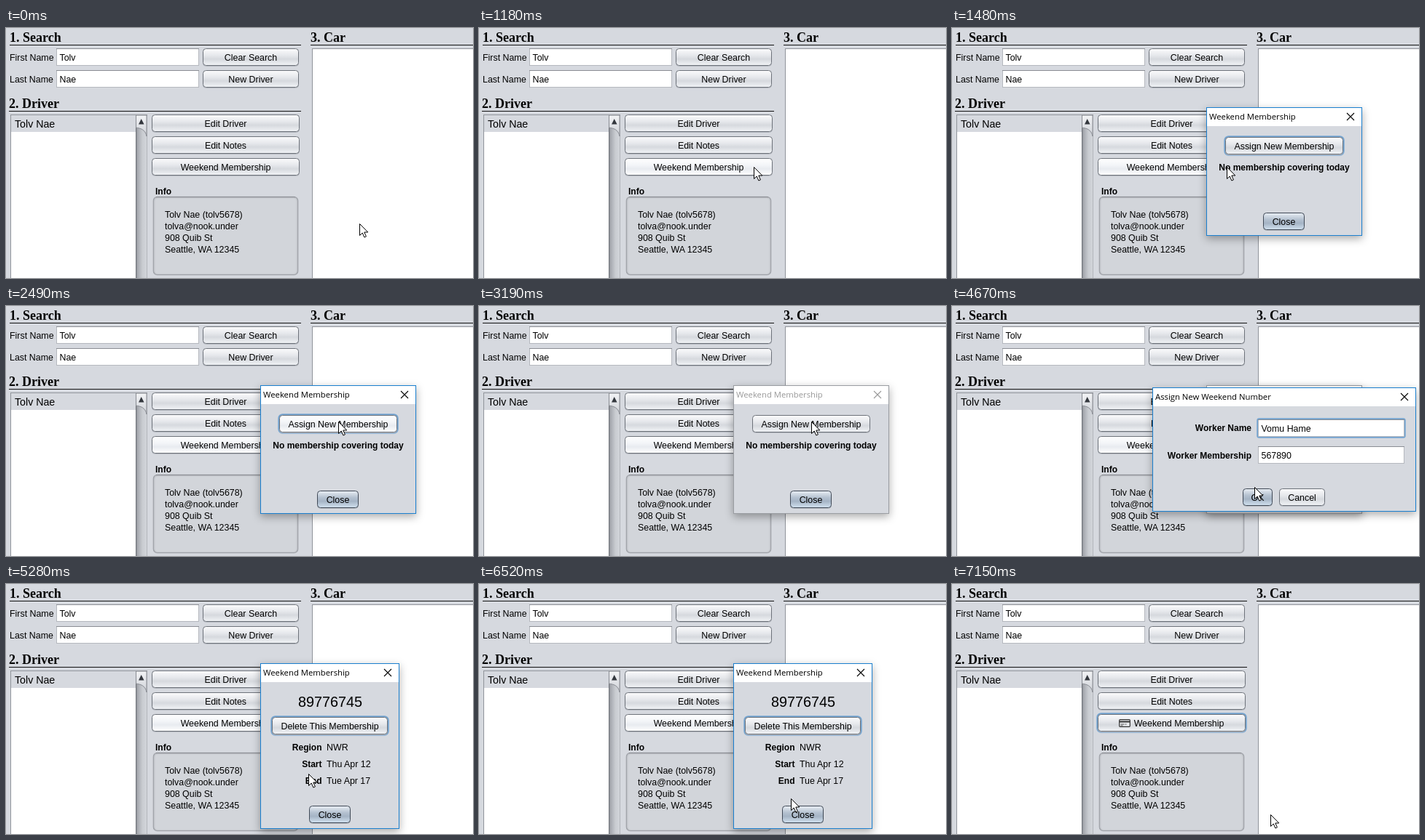
An HTML page that plays this animation: 641x344 px, repeating every 7.99 s.

```html
<!DOCTYPE html>
<html lang="en">
<head>
<meta charset="utf-8">
<title>Weekend membership</title>
<style>
  html, body { margin: 0; width: 100%; height: 100%; overflow: hidden; background: #d6d9df; }
  svg { display: block; width: 100%; height: 100%; }
  text { font: 12.4px "Liberation Sans", Arial, sans-serif; white-space: pre; }
  .bold { font-weight: bold; font-size: 12px; }
  .row { font-size: 14.2px; }
  .big { font-size: 19.8px; }
  .head { font: bold 18px "Liberation Serif", "Times New Roman", serif; }
  .title { font: 11.3px "Open Sans", sans-serif; }
  .window { filter: drop-shadow(0 4px 6px rgba(0, 0, 0, .33)); }
</style>
</head>
<body>
<svg viewBox="0 0 641 344">
  <defs id="defs"></defs>
  <g id="stage"></g>
</svg>
<script>
const LOOP = 7990;
const FIRST = 'Tolv', LAST = 'Nae', WORKER = 'Vomu Hame';

// Button faces: top, middle, lower middle, bottom, border
const FACES = {
  normal: ['#fbfbfc', '#e6e8ec', '#d6d9de', '#f1f3f6', '#6d727a'],
  hover: ['#ffffff', '#f3f5f8', '#e8ebf0', '#ffffff', '#6d727a'],
  main: ['#e9eef4', '#b4c1d0', '#a5b4c5', '#d2e2f0', '#414a57'],
  mainHover: ['#f6f9fc', '#c6d3e1', '#b8c8d9', '#e4f1fc', '#414a57'],
  pressed: ['#a3adba', '#8693a4', '#7c8a9c', '#a5b3c4', '#333b47']
};
const gradient = (id, stops, dir) => `<linearGradient id="${id}" ${dir}>` +
  stops.map(([at, c]) => `<stop offset="${at}" stop-color="${c}"/>`).join('') + '</linearGradient>';
document.getElementById('defs').innerHTML =
  Object.entries(FACES).map(([id, c]) =>
    gradient(id, [[0, c[0]], [.4, c[1]], [.62, c[2]], [1, c[3]]], 'x2="0" y2="1"')).join('') +
  gradient('track', [[0, '#85888e'], [.2, '#a9acb2'], [.6, '#c9ccd1'], [1, '#d3d6db']], '') +
  gradient('arrowBox', [[0, '#f2f3f5'], [1, '#cfd2d8']], 'x2="0" y2="1"');

const text = (x, y, s, cls = '', anchor = 'start', fill = '#000') =>
  `<text x="${x}" y="${y}" class="${cls}" text-anchor="${anchor}" fill="${fill}">${s}</text>`;
const box = (x, y, w, h, fill, stroke = 'none', r = 0, sw = 1) =>
  `<rect x="${x}" y="${y}" width="${w}" height="${h}" rx="${r}" fill="${fill}" stroke="${stroke}" stroke-width="${sw}"/>`;
const path = (d, fill, stroke = 'none', sw = 1) =>
  `<path d="${d}" fill="${fill}" stroke="${stroke}" stroke-width="${sw}"/>`;

function button(x, y, w, label, face = 'normal', ring = false, shift = 0) {
  return (ring ? box(x - .5, y - .5, w + 1, 25, 'none', '#73a4d1', 5, 2.4) : '') +
    box(x + .5, y + 1.5, w - 1, 23, 'none', '#b4b8bf', 4) +
    box(x + .5, y + .5, w - 1, 23, `url(#${face})`, FACES[face][4], 4) +
    text(x + w / 2 + shift, y + 17, label, '', 'middle');
}

function field(x, y, w, value, focus = false) {
  return (focus ? box(x - .5, y - .5, w + 1, 25, 'none', '#73a4d1', 2, 2.4) : '') +
    box(x + .5, y + .5, w - 1, 23, '#fff', '#b5b8be') +
    path(`M${x} ${y + .5}h${w}`, 'none', '#8a8d93') +
    text(x + 4.5, y + 17, value);
}

function dialog(x, y, w, h, bar, title, body, active = true, p = 1) {
  const ease = 1 - (1 - p) ** 2, s = .9 + .1 * ease;
  const cx = x + w / 2, cy = y + h / 2, kx = x + w - 16, ky = y + 13;
  const ink = active ? '#000' : '#999';
  return `<g class="window" opacity="${ease}" transform="translate(${cx} ${cy}) scale(${s}) translate(${-cx} ${-cy})">` +
    box(x + .5, y + .5, w - 1, h - 1, '#d6d9df', active ? '#1a7fcf' : '#9a9da2') +
    box(x + 1, y + 1, w - 2, bar, '#fff') +
    text(x + 4, y + 17, title, 'title', 'start', ink) +
    path(`M${kx - 5} ${ky - 5}l10 10m0 -10l-10 10`, 'none', ink, 1.1) + body + '</g>';
}

function mainWindow(weekend) {
  const underline = (x, y, end) => path(`M${x} ${y}H${end}`, 'none', '#111');
  const info = [`${FIRST} ${LAST} (tolv5678)`, 'tolva@nook.under', '908 Quib St', 'Seattle, WA 12345'];
  return box(0, 0, 641, 344, '#d6d9df') +
    text(5, 19, '1. Search', 'head') + underline(5, 23.5, 405) +
    text(4, 110, '2. Driver', 'head') + underline(4, 114.5, 405) +
    text(418, 19, '3. Car', 'head') + underline(418, 23.5, 641) +
    text(5, 45, 'First Name') + field(69, 28, 196, FIRST) +
    text(5, 75, 'Last Name') + field(69, 58, 196, LAST) +
    button(270, 28, 132, 'Clear Search') + button(270, 58, 132, 'New Driver') +
    // driver list with its scroll bar
    box(6.5, 119.5, 187, 240, '#fff', '#90949b') + box(7, 120, 171, 23, '#d6d9df') +
    box(178, 120, 15.5, 230, 'url(#track)') +
    path('M178.5 120V350', 'none', '#6f7379') +
    path('M178.5 120H193V149C191 139 184 138 178.5 137Z', 'url(#arrowBox)', '#8a8d94') +
    path('M182 132.5L185.7 125L189.500 132.5Z', '#33373d') +
    text(12, 137, `${FIRST} ${LAST}`, 'row') +
    button(200, 119, 203, 'Edit Driver') + button(200, 149, 203, 'Edit Notes') + weekend +
    text(205, 229, 'Info', 'bold') +
    box(202.5, 232.5, 198, 107, '#d2d5da', '#a1a4aa', 5, 1.6) +
    box(204, 234, 195, 104.500, 'none', '#c5c8cd', 4) +
    path('M206 232.700H397', 'none', '#888b91') +
    info.map((s, i) => text(218, 261 + 16 * i, s)).join('') +
    box(420.5, 28.5, 230, 330, '#fff', '#90949b');
}

const cardIcon = box(229.7, 186.700, 14.6, 9.6, '#e9ebee', '#333', 1, 1.2) +
  box(230, 188.500, 14, 2, '#333') + path('M231.5 193h5m1 0h2M231.5 194.900h3', 'none', '#444', .9);

const arrow = (x, y) => `<g transform="translate(${x + .5} ${y + .5})">` +
  path('M0 0V16L3.700 12.500L6.400 18.500L8.900 17.400L6.300 11.500H11.300Z', '#fff', '#000') + '</g>';
const beam = (x, y) => path(`M${x - 2.5} ${y - 5.500}h2.500l1 1l1 -1h2.500M${x + 1} ${y - 5}v13M${x - 2.500} ${y + 8.500}h2.500l1 -1l1 1h2.500`, 'none', '#222');

// Progress from a to b in n held steps, the first one already at 1/n
function steps(t, a, b, n) {
  return t < a ? 0 : Math.min(1, (Math.floor((t - a) / (b - a) * (n - 1) + .1) + 1) / n);
}
const opening = (t, a, b, n) => Math.max(0, (steps(t, a, b, n) * n - 1) / (n - 1));

// Pointer moves: begin, end, steps, x, y
const MOVES = [
  [80, 460, 6, 377, 191], [2180, 2490, 5, 456, 159], [4340, 4670, 5, 415, 249],
  [4740, 4820, 2, 415, 261], [6290, 6750, 7, 437, 317]
];
function pointer(t) {
  let x = 485, y = 269;
  for (const [a, b, n, tx, ty] of MOVES) {
    const p = steps(t, a, b, n), e = p * p * (3 - 2 * p);
    x += (tx - x) * e;
    y += (ty - y) * e;
  }
  return [Math.round(x), Math.round(y)];
}

function scene(t) {
  const [cx, cy] = pointer(t);
  const during = (a, b) => t >= a && t < b;
  const over = (x, y, w) => cx >= x && cx < x + w && cy >= y && cy < y + 24;
  const face = (x, y, w, down, up, main) =>
    during(down, up) ? 'pressed' : (main ? 'main' : 'normal').replace(/$/, over(x, y, w) ? 'H' : '')
      .replace('normalH', 'hover').replace('mainH', 'mainHover');

  const done = t >= 7150;
  const lit = during(1180, 7150) ? 'hover' : face(200, 179, 203, 1010, 1180);
  let out = mainWindow(button(200, 179, 203, 'Weekend Membership', lit, during(1010, 1180) || done, done ? 10 : 0) +
    (done ? cardIcon : ''));

  if (during(1180, 5127)) {
    const active = t < 3190;
    out += dialog(349, 109, 214, 177, 25, 'Weekend Membership',
      button(375, 150, 162, 'Assign New Membership', active ? face(375, 150, 162, 3040, 3190) : 'normal', active) +
      text(456, 196, 'No membership covering today', 'bold', 'middle') +
      button(427, 254, 57, 'Close', 'main'), active, opening(t, 1180, 1480, 5));
  }
  if (during(5127, 7150)) {
    const closing = t >= 7000;
    const facts = [['Region', 'NWR'], ['Start', 'Thu Apr 12'], ['End', 'Tue Apr 17']];
    out += dialog(349, 109, 191, 228, 25, 'Weekend Membership',
      text(445, 169, '89776745', 'big', 'middle') +
      button(365, 183, 159, 'Delete This Membership', 'normal', !closing) +
      facts.map(([k, v], i) => text(433.5, 229 + 23 * i, k, 'bold', 'end') + text(440, 229 + 23 * i, v)).join('') +
      button(416, 305, 57, 'Close', face(416, 305, 57, 7000, 7150, true), closing));
  }
  if (during(3190, 5280)) {
    const clicked = t >= 4900;
    const caret = Math.floor((t - 3270) / 460) % 2 === 0;
    const p = t < 5050 ? opening(t, 3190, 3500, 5) : 1 - steps(t, 5050, 5280, 4);
    out += dialog(275, 112, 362, 171, 25, 'Assign New Weekend Number',
      text(411, 172, 'Worker Name', 'bold', 'end') + field(420, 156, 201, WORKER, !clicked) +
      (caret ? path('M494.5 159v16', 'none', '#000') : '') +
      text(411, 210, 'Worker Membership', 'bold', 'end') + field(420, 193, 201, '567890') +
      button(399, 251, 41, 'OK', face(399, 251, 41, 4900, 5050, true), clicked) +
      button(449, 251, 63, 'Cancel'), true, p);
  }
  return out + (during(3267, 4340) ? beam(cx + .5, cy) : arrow(cx, cy));
}

const stage = document.getElementById('stage');
let shown = '';
function tick() {
  const next = scene(performance.now() % LOOP);
  if (next !== shown) stage.innerHTML = shown = next;
  requestAnimationFrame(tick);
}
tick();
</script>
</body>
</html>
```
